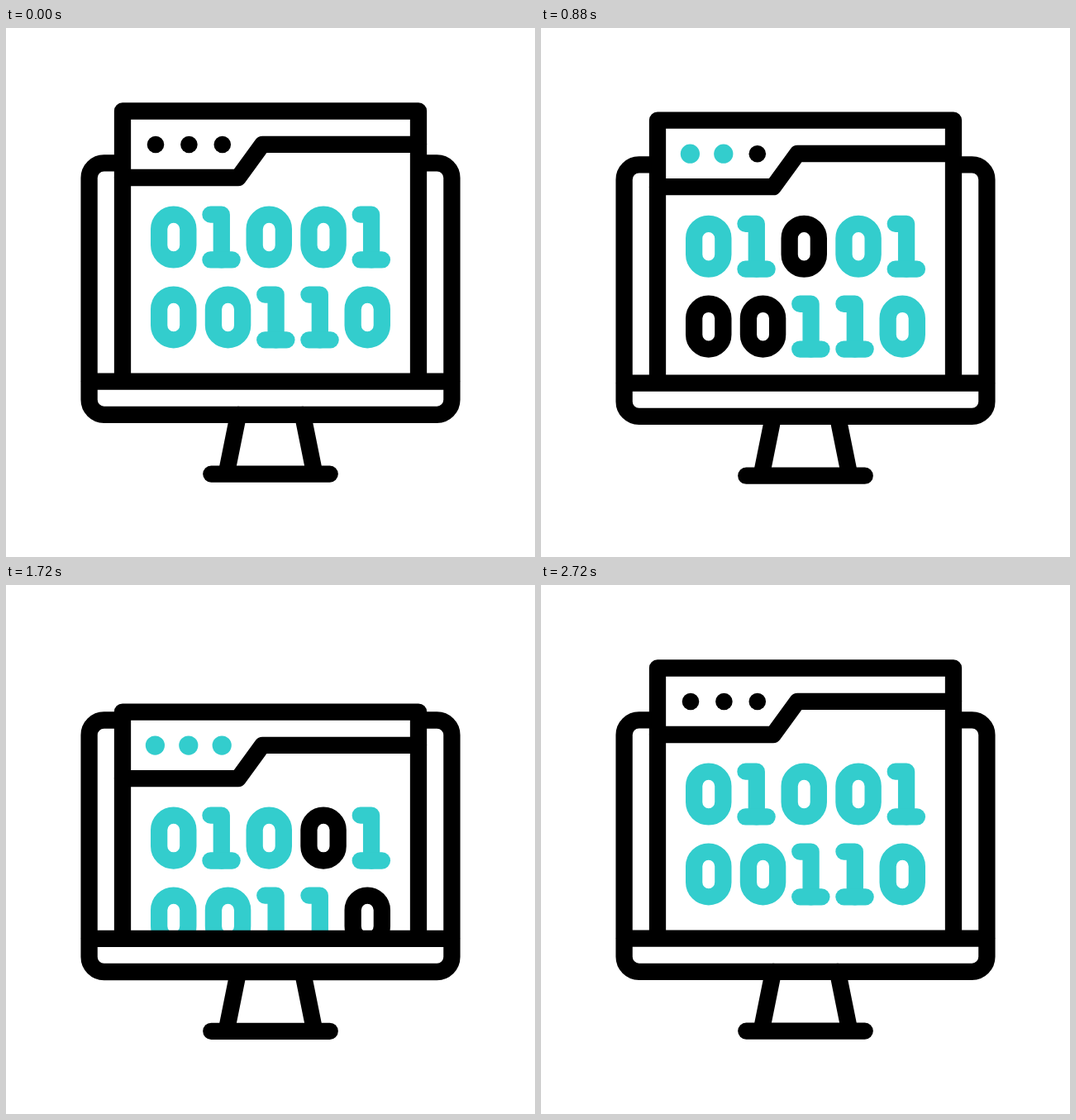
Recreate the animation shown at these times as an HTML page with a canvas. Size 640 by 640 pixels, loop 3 s.

```html
<!DOCTYPE html>
<html lang="en">
<head>
<meta charset="utf-8">
<title>Binary code monitor</title>
<style>
html, body { margin: 0; width: 100%; height: 100%; overflow: hidden; background: #fff; }
canvas { display: block; width: 640px; height: 640px; }
</style>
</head>
<body>
<canvas id="stage" width="640" height="640"></canvas>
<script>
const ctx = document.getElementById('stage').getContext('2d');
const LOOP = 3000, STEP = 40, BEAT = 400;
const CENTRE = 320, LINE = 20.3, BAR_Y = 427.6;
const BLACK = '#000', TEAL = '#33cdcd';

// Vertical offsets as [time, offset] turning points
const windowKeys = [[0, 0], [620, -38], [1300, 116], [1455, 116], [2055, -38], [2720, 0]];
const monitorKeys = [[0, 0], [560, -13], [1100, 10.5], [1380, 12], [1440, 12], [2020, -13], [2720, 0]];

// Positions in the text that light up on each beat
const text = '0100100110';
const blackDigits = ['', '0467', '256', '258', '39'];
const tealDots = ['', '', '01', '2', '012'];

const isLit = (beats, beat, i) => (beats[beat] || '').includes(i);

function position(keys, t) {
  const next = keys.findIndex(([time]) => time > t);
  if (next < 0) return keys[keys.length - 1][1];
  const [start, from] = keys[next - 1], [end, to] = keys[next];
  const ease = (1 - Math.cos(Math.PI * (t - start) / (end - start))) / 2;
  return from + (to - from) * ease;
}

function line(...points) {
  ctx.beginPath();
  points.forEach(([x, y]) => ctx.lineTo(x, y));
  ctx.stroke();
}

function roundBox(x, y, w, h, r) {
  ctx.beginPath();
  ctx.roundRect(x, y, w, h, r);
  ctx.stroke();
}

function drawDigit(digit, x, y) {
  const left = x + LINE / 2, top = y + LINE / 2, bottom = top + 54.8;
  if (digit === '0') {
    roundBox(left, top, 35.2, 54.8, 17.6);
  } else {
    line([left, top], [x + 23.5, top], [x + 23.5, bottom]);
    line([left, bottom], [x + 36.3, bottom]);
  }
}

function advance(digit, next) {
  if (digit === '1') return 53.2;
  return next === '1' ? 62.3 : 65.8;
}

function drawDigits(beat) {
  let x;
  [...text].forEach((digit, i) => {
    if (i % 5 === 0) x = 175;
    ctx.strokeStyle = isLit(blackDigits, beat, i) ? BLACK : TEAL;
    drawDigit(digit, x, i < 5 ? 215.5 : 312.4);
    x += advance(digit, text[i + 1]);
  });
}

function drawDots(beat) {
  for (let i = 0; i < 3; i++) {
    const teal = isLit(tealDots, beat, i);
    ctx.fillStyle = teal ? TEAL : BLACK;
    ctx.beginPath();
    ctx.arc(181 + 40.4 * i - (teal ? 0.6 : 0), 141, teal ? 11.6 : 10.3, 0, 2 * Math.PI);
    ctx.fill();
  }
}

function drawWindow(beat) {
  const left = 141, right = 499, top = 100.5, below = 600;
  ctx.fillStyle = '#fff';
  ctx.fillRect(left, top, right - left, below - top);
  drawDigits(beat);
  ctx.strokeStyle = BLACK;
  line([left, below], [left, top], [right, top], [right, below]);
  line([left, 181], [281, 181], [310.3, 140.8], [right, 140.8]);
  drawDots(beat);
}

function drawMonitor() {
  ctx.strokeStyle = BLACK;
  roundBox(100.6, 163.3, 438.8, 304.5, 18);
  for (const side of [-1, 1]) {
    line([CENTRE + side * 39, 468], [CENTRE + side * 52.7, 536]);
  }
  line([248.3, 539.6], [391.7, 539.6]);
}

function draw(t) {
  const monitorY = position(monitorKeys, t);
  const windowY = position(windowKeys, t);
  const barY = BAR_Y + monitorY;

  ctx.fillStyle = '#fff';
  ctx.fillRect(0, 0, 640, 640);
  ctx.lineWidth = LINE;
  ctx.lineCap = ctx.lineJoin = 'round';

  ctx.save();
  ctx.translate(0, monitorY);
  drawMonitor();
  ctx.restore();

  ctx.save();
  ctx.beginPath();
  ctx.rect(0, 0, 640, barY);
  ctx.clip();
  ctx.translate(0, windowY);
  drawWindow(Math.floor(t / BEAT));
  ctx.restore();

  ctx.strokeStyle = BLACK;
  line([101, barY], [539, barY]);
}

const startTime = performance.now();
function tick() {
  const t = (performance.now() - startTime) % LOOP;
  draw(Math.floor(t / STEP) * STEP);
  requestAnimationFrame(tick);
}
tick();
</script>
</body>
</html>
```
